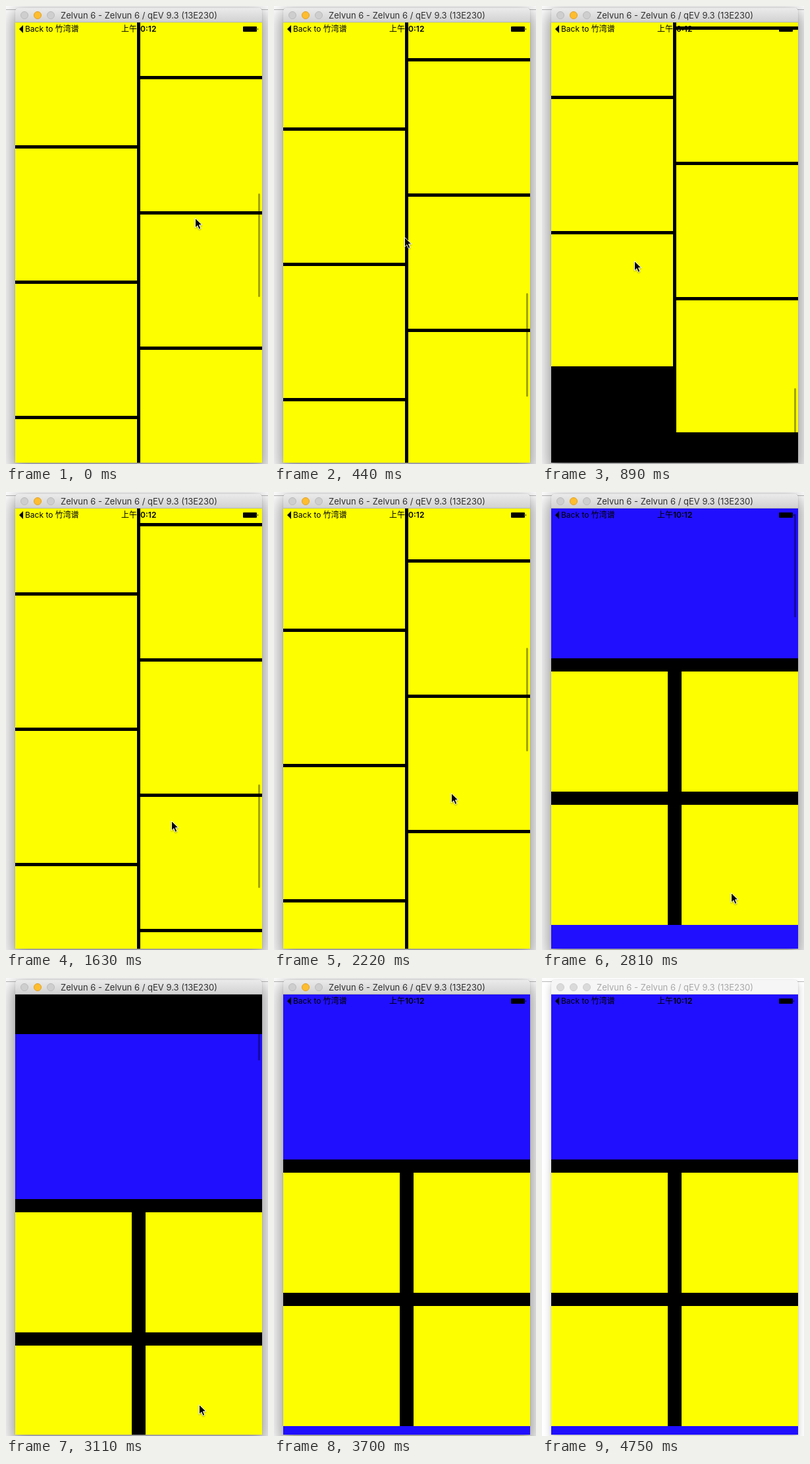
Recreate the animation shown at these times as an HTML page. Size 398 px wide and 694 px high, loop 4.77 s.

```html
<!DOCTYPE html>
<html lang="en">
<head>
<meta charset="utf-8">
<title>Scrolling columns</title>
<style>
  html, body { margin: 0; width: 100%; height: 100%; overflow: hidden; background: #fff; }
  div, svg, span { position: absolute; white-space: nowrap; }
  #stage { left: 0; top: 0; width: 398px; height: 694px; overflow: hidden; background: #fff;
    font-family: Inter, Roboto, "Noto Sans CJK SC", "Noto Sans CJK", sans-serif; color: #000; }
  #rule { left: 0; top: 5px; width: 398px; height: 1px; background: #b8b8b8; }
  #win { left: 14px; top: 3px; width: 375px; height: 689px; border-radius: 5px 5px 0 0;
    box-shadow: 0 0 1px rgba(0,0,0,.45), 0 10px 26px 5px rgba(0,0,0,.42); }
  #bar { left: 0; top: 0; width: 375px; height: 22px; box-sizing: border-box; border-radius: 5px 5px 0 0;
    background: linear-gradient(#ebebeb, #d2d2d2); border-bottom: 1px solid #b4b4b4; }
  #bar i { position: absolute; top: 5px; width: 12px; height: 12px; box-sizing: border-box;
    border-radius: 50%; background: #cecece; border: 1px solid #bbb; }
  #bar i.mid { background: #fdbd2f; border-color: #e0a128; }
  #title { left: 69px; top: 0; font-size: 13px; line-height: 22px; color: #303030; }
  .idle #win { box-shadow: 0 0 1px rgba(0,0,0,.4), 0 6px 12px 1px rgba(0,0,0,.2); }
  .idle #bar { background: #f6f6f6; border-color: #d5d5d5; }
  .idle #bar i { background: #dadada; border-color: #cdcdcd; }
  .idle #title { color: #a8a8a8; }
  #view { left: 0; top: 22px; width: 375px; height: 667px; overflow: hidden; background: #000; }
  #page { left: 0; top: 0; width: 375px; }
  #thumb { left: 369px; width: 3px; border-radius: 1.5px; background: rgba(0,0,0,.36); }
  .status { top: 2px; font-size: 12px; line-height: 16px; }
  .status b { font-weight: 600; }
  #cursor { left: 0; top: 0; overflow: visible; filter: drop-shadow(0 1px 1px rgba(0,0,0,.35)); }
</style>
</head>
<body>
<div id="stage">
  <div id="rule"></div>
  <div id="win">
    <div id="bar">
      <i style="left:8px"></i><i class="mid" style="left:28px"></i><i style="left:48px"></i>
      <span id="title">Zelvun 6 - Zelvun 6 / qEV 9.3 (13E230)</span>
    </div>
    <div id="view">
      <div id="page"></div>
      <div id="thumb"></div>
      <span class="status" style="left:15px">Back to 竹湾谱</span>
      <span class="status" style="left:161px">上午<b>10:12</b></span>
      <svg width="375" height="20" style="left:0;top:0">
        <path d="M6 10L12 4V16Z"/>
        <rect x="346" y="6" width="21" height="8" rx="1"/>
        <path d="M368 8.5q2 1.5 0 3z"/>
      </svg>
    </div>
  </div>
  <svg id="cursor" width="14" height="20">
    <path d="M.5 .5V15L3.9 11.8L6.2 17.3L8.8 16.2L6.5 10.8H11Z" stroke="#fff"/>
  </svg>
</div>
<script>
const $ = id => document.getElementById(id);
const VIEW = 667, WIDTH = 375, TRACK = 663;
const LOOP = 4770, IDLE = 4750, STEP = 148.2, LAST = 25;
const BLUE = '#200fff', YELLOW = '#fdff00';

function block(x, y, w, h, color) {
  const d = document.createElement('div');
  d.style.cssText = `left:${x}px;top:${y}px;width:${w}px;height:${h}px;background:${color}`;
  $('page').append(d);
  return y + h;
}

// Stacks cells in two columns and returns the lower end.
function columns(top, gap, rows, height) {
  const w = Math.floor((WIDTH - gap) / 2);
  const ends = [0, WIDTH - w].map((x, col) => {
    let y = top;
    for (let row = 0; row < rows; row++) y = block(x, y, w, height(row, col), YELLOW) + gap;
    return y - gap;
  });
  return Math.max(...ends);
}

let end = block(0, 0, WIDTH, 250, BLUE);
end = columns(end + 20, 20, 2, () => 182);
end = block(0, end, WIDTH, 100, BLUE);
// A half-height first cell staggers the left column.
const CONTENT = columns(end + 5, 5, 10, (row, col) => row + col ? 200 : 100);
const MAX = CONTENT - VIEW;

// Turning points of the flicks: step, scroll offset and pointer position.
const KEYS = [
  { i: 0, scroll: 1083, x: 287, y: 321 },
  { i: 6, scroll: 2183, x: 140, y: 386 },
  { i: 11, scroll: 1757, x: 251, y: 498 },
  { i: 15, scroll: 882, x: 269, y: 456 },
  { i: 19, scroll: 23, x: 287, y: 607 },
  { i: LAST, scroll: 0, x: 302, y: 700 }
];

// Smooth curve through the keys.
function at(step, name) {
  const k = Math.max(0, KEYS.findLastIndex((key, n) => key.i <= step && n < KEYS.length - 1));
  const a = KEYS[k], b = KEYS[k + 1], p = KEYS[k - 1] || a, n = KEYS[k + 2] || b;
  const span = b.i - a.i, u = (step - a.i) / span, v = 1 - u;
  const slope = (from, to) => (to[name] - from[name]) / (to.i - from.i) * span;
  return Math.round(a[name] * v * v * (1 + 2 * u) + b[name] * u * u * (1 + 2 * v)
    + slope(p, b) * u * v * v - slope(a, n) * u * u * v);
}

function draw(t) {
  const step = Math.min(LAST, Math.floor((t + 9) / STEP));
  const scroll = at(step, 'scroll');
  const inside = Math.min(Math.max(scroll, 0), MAX);
  const over = Math.abs(scroll - inside);
  const thumb = $('thumb').style, cursor = $('cursor').style;
  $('page').style.transform = `translateY(${-scroll}px)`;
  thumb.top = Math.round(2.5 + TRACK * inside / CONTENT + Math.max(0, scroll - MAX)) + 'px';
  thumb.height = Math.floor(TRACK * VIEW / CONTENT - over) + 'px';
  thumb.opacity = Math.min(1, (LAST - step) / 2);
  cursor.transform = `translate(${at(step, 'x')}px,${at(step, 'y')}px)`;
  $('stage').className = t >= IDLE ? 'idle' : '';
}

const start = performance.now();
function tick() {
  draw((performance.now() - start) % LOOP);
  requestAnimationFrame(tick);
}
tick();
</script>
</body>
</html>
```
